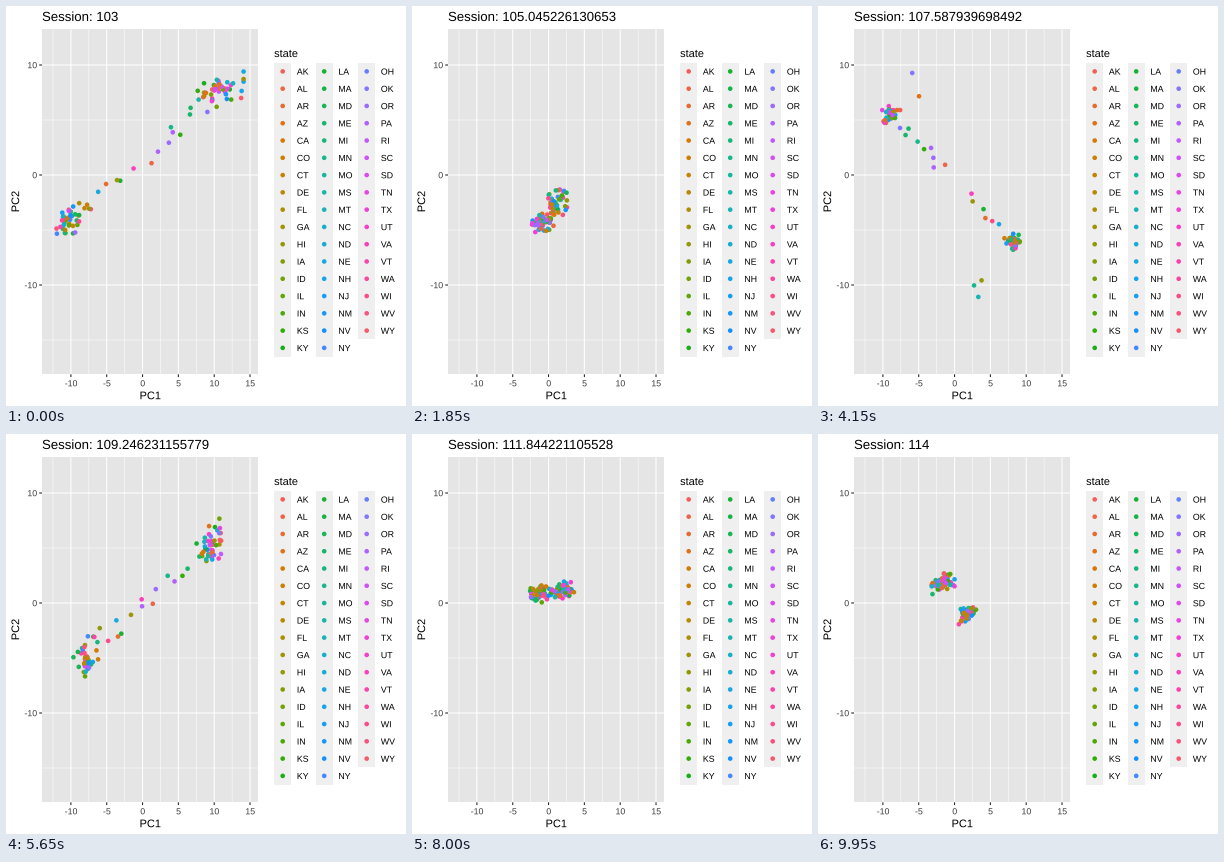
These frames come from a looping animation (400x400 px, 10 s). A matplotlib script:

```python
import numpy as np
import matplotlib.pyplot as plt
from matplotlib.animation import FuncAnimation
from matplotlib.patches import PathPatch, Rectangle
from matplotlib.textpath import TextPath
from matplotlib.transforms import Affine2D

plt.rcParams["font.family"] = "Liberation Sans"

FRAMES, INTERVAL = 200, 50
FIRST, LAST = 103, 114
KEYS = np.round(np.linspace(0, FRAMES - 1, LAST - FIRST + 1)).astype(int)

STATES = ("AK AL AR AZ CA CO CT DE FL GA HI IA ID IL IN KS KY "
          "LA MA MD ME MI MN MO MS MT NC ND NE NH NJ NM NV NY "
          "OH OK OR PA RI SC SD TN TX UT VA VT WA WI WV WY").split()
BOTH_RIGHT = "AK AL AZ ID KS KY ME MS NC NH OK PA SC TN TX UT WY".split()
BOTH_LEFT = "CA CT DE HI IL MA MD MI ND NJ NY VT WA WI WV".split()
# Members between the two camps, the most moderate first.
RIGHT_MODERATES = "AL PA OR PA KS MN ME ME OK MO".split()
LEFT_MODERATES = "VA GA LA AR WI NE HI CO".split()

rng = np.random.default_rng(11)


# ---- colours -------------------------------------------------------------

def hue_colour(i, n=len(STATES), chroma=100, light=65):
    """Evenly spaced polar-LUV hue, shown through a gamma 1.8 display profile."""
    h = np.radians(15 + 360 * i / n)
    y = ((light + 16) / 116) ** 3
    u = chroma * np.cos(h) / (13 * light) + 0.1978
    v = chroma * np.sin(h) / (13 * light) + 0.4683
    xyz = [9 * y * u / (4 * v), y, (12 - 3 * u - 20 * v) * y / (4 * v)]
    linear = np.array([[3.2405, -1.5371, -0.4985],
                       [-0.9693, 1.8760, 0.0416],
                       [0.0556, -0.2040, 1.0572]]) @ xyz
    display = np.array([[0.972, 0.027, 0.0],
                        [-0.021, 1.058, -0.041],
                        [0.0, 0.003, 0.994]]) @ np.clip(linear, 0, 1)
    return np.clip(display, 0, 1) ** (1 / 1.8)


COLOURS = np.array([hue_colour(i) for i in range(len(STATES))])
PANEL, KEY_FILL = "#e5e5e5", "#efefef"
TICK_TEXT, TICK = "#3c3c3c", "#262626"


# ---- members and poses ---------------------------------------------------

def seat(state, which):
    return 2 * STATES.index(state) + which


def is_right(member):
    state = STATES[member // 2]
    return state in BOTH_RIGHT or (state not in BOTH_LEFT and member % 2 == 0)


MEMBERS = 2 * len(STATES)
RIGHT = np.array([is_right(m) for m in range(MEMBERS)])

# How far each member leans to the other camp, 0 to 1.
lean = np.zeros(MEMBERS)
for k, state in enumerate(RIGHT_MODERATES):
    lean[seat(state, RIGHT_MODERATES[:k].count(state))] = 1 - k / len(RIGHT_MODERATES)
for k, state in enumerate(LEFT_MODERATES):
    lean[seat(state, 1)] = 0.85 * (1 - k / len(LEFT_MODERATES))


def pose(left, right, left_size=(0.7, 0.5), right_size=None, mix=0.0, marks=()):
    """Two clouds; moderates are pulled to the other one as the gap widens."""
    side = (RIGHT | (rng.random(MEMBERS) < mix))[:, None]
    left, right = np.array(left), np.array(right)
    a, b = np.clip(rng.normal(size=(2, MEMBERS)), -2, 2)
    noise = np.column_stack([a, 0.35 * a + 0.94 * b])
    noise *= np.where(side, right_size or left_size, left_size)
    home, other = np.where(side, right, left), np.where(side, left, right)
    reach = 0.02 * np.hypot(*(right - left))
    pts = home + reach * lean[:, None] * (other - home) + noise
    for state, x, y in marks:
        pts[seat(state, 1)] = x, y
    return pts


POSES = [
    pose((-10.3, -4.1), (10.9, 7.6), (1.1, 0.75), (1.6, 0.7)),
    pose((-2.6, -2.6), (2.8, 1.6)),
    pose((1.1, -2.8), (-0.8, -4.6), (0.8, 0.7), (0.8, 0.5)),
    pose((1.8, 0.0), (-1.3, 0.5)),
    pose((7.2, -5.5), (-8.6, 5.0)),
    pose((8.9, -6.5), (-9.1, 5.9),
         marks=[("MN", 0, -13.4), ("MT", 1, -14), ("HI", 2, -13),
                ("OK", -3.9, 12), ("AZ", -2, 8.3)]),
    pose((-10.2, -4.9), (11.7, 7.2), (0.7, 0.5), (0.9, 0.9)),
    pose((-0.4, -8.3), (1.2, -1.5), (0.5, 0.5), (2.0, 2.5), mix=0.45,
         marks=[("IL", -0.4, -11)]),
    pose((-1.0, -0.2), (1.8, 0.6)),
    pose((-1.1, 1.1), (1.9, 1.2), (0.9, 0.45)),
    pose((6.5, 0.8), (-7.4, 1.5)),
    pose((1.8, -0.95), (-1.6, 1.9), (0.6, 0.4), (0.8, 0.4)),
]
ORDER = rng.permutation(MEMBERS)


def positions(n):
    k = min(np.searchsorted(KEYS, n, side="right") - 1, len(KEYS) - 2)
    t = (n - KEYS[k]) / (KEYS[k + 1] - KEYS[k])
    return ((1 - t) * POSES[k] + t * POSES[k + 1])[ORDER]


# ---- stage, in pixels ----------------------------------------------------

def px(x):
    return 136.55 + 7.165 * np.asarray(x, float)


def py(y):
    return 169 - 11 * np.asarray(y, float)


fig = plt.figure(figsize=(4, 4), dpi=100, facecolor="white")
ax = fig.add_axes([0, 0, 1, 1])
ax.set(xlim=(0, 400), ylim=(400, 0))
ax.axis("off")

L, R, T, B = 36, 252, 23.3, 368.3
DOT = (4.62 * 0.72) ** 2


def rect(x, y, w, h, colour):
    ax.add_patch(Rectangle((x, y), w, h, fc=colour, lw=0, zorder=0))


def label(x, y, s, size, colour="black", align=0.0, angle=0):
    """Outlined text on a baseline; align is 0 left, 0.5 centre, 1 right."""
    path = TextPath((0, 0), s, size=size)
    shift = -align * path.get_extents().x1
    place = Affine2D().translate(shift, 0).rotate_deg(angle).scale(1, -1).translate(x, y)
    patch = PathPatch(path, fc=colour, lw=0, snap=False, zorder=2,
                      transform=place + ax.transData)
    return ax.add_patch(patch)


def lines(draw, at, lo, hi, colour, width):
    draw(at, lo, hi, colors=colour, linewidths=width * 0.72, zorder=1).set_snap(False)


rect(L, T, R - L, B - T, PANEL)
x_ticks, y_ticks = np.arange(-10, 16, 5), np.array([10, 0, -10])
lines(ax.vlines, px(np.arange(-12.5, 13, 5)), T, B, "white", 0.53)
lines(ax.hlines, py([5, -5, -15]), L, R, "white", 0.53)
lines(ax.vlines, px(x_ticks), T, B, "white", 1.07)
lines(ax.hlines, py(y_ticks), L, R, "white", 1.07)
lines(ax.vlines, px(x_ticks), B, B + 2.75, TICK, 1.07)
lines(ax.hlines, py(y_ticks), L - 2.75, L, TICK, 1.07)

for v in x_ticks:
    label(px(v), 380.3, str(v), 8.8, TICK_TEXT, align=0.5)
for v in y_ticks:
    label(30.8, py(v) + 3.2, str(v), 8.8, TICK_TEXT, align=1)
label(144, 393.2, "PC1", 11, align=0.5)
label(13.1, 195.8, "PC2", 11, align=0.5, angle=90)

# Legend: each column is a key, a gap, its widest label and another gap.
label(268.1, 51, "state", 11)
STEP, ROWS = 17.28, 17
for c, x in enumerate((276.7, 318.2, 360.7)):
    column = STATES[c * ROWS:(c + 1) * ROWS]
    y = 65.4 + STEP * np.arange(len(column))
    rect(x - STEP / 2, y[0] - STEP / 2, STEP, STEP * len(column), KEY_FILL)
    ax.scatter(np.full(len(y), x), y, s=DOT, linewidths=0,
               c=COLOURS[c * ROWS:c * ROWS + len(y)])
    for s, row in zip(column, y):
        label(x + STEP / 2 + 5.5, row + 3.2, s, 8.8)

title = label(L, 15, "Session", 13.2)
dots = ax.scatter(np.zeros(MEMBERS), np.zeros(MEMBERS), s=DOT,
                  c=COLOURS[ORDER // 2], linewidths=0, zorder=3)


def draw(n):
    session = FIRST + (LAST - FIRST) * n / (FRAMES - 1)
    title.set_path(TextPath((0, 0), f"Session: {session:.15g}", size=13.2))
    pts = positions(n)
    dots.set_offsets(np.column_stack([px(pts[:, 0]), py(pts[:, 1])]))
    return title, dots


anim = FuncAnimation(fig, draw, frames=FRAMES, interval=INTERVAL,
                     repeat=True, repeat_delay=0)
plt.show()
```
